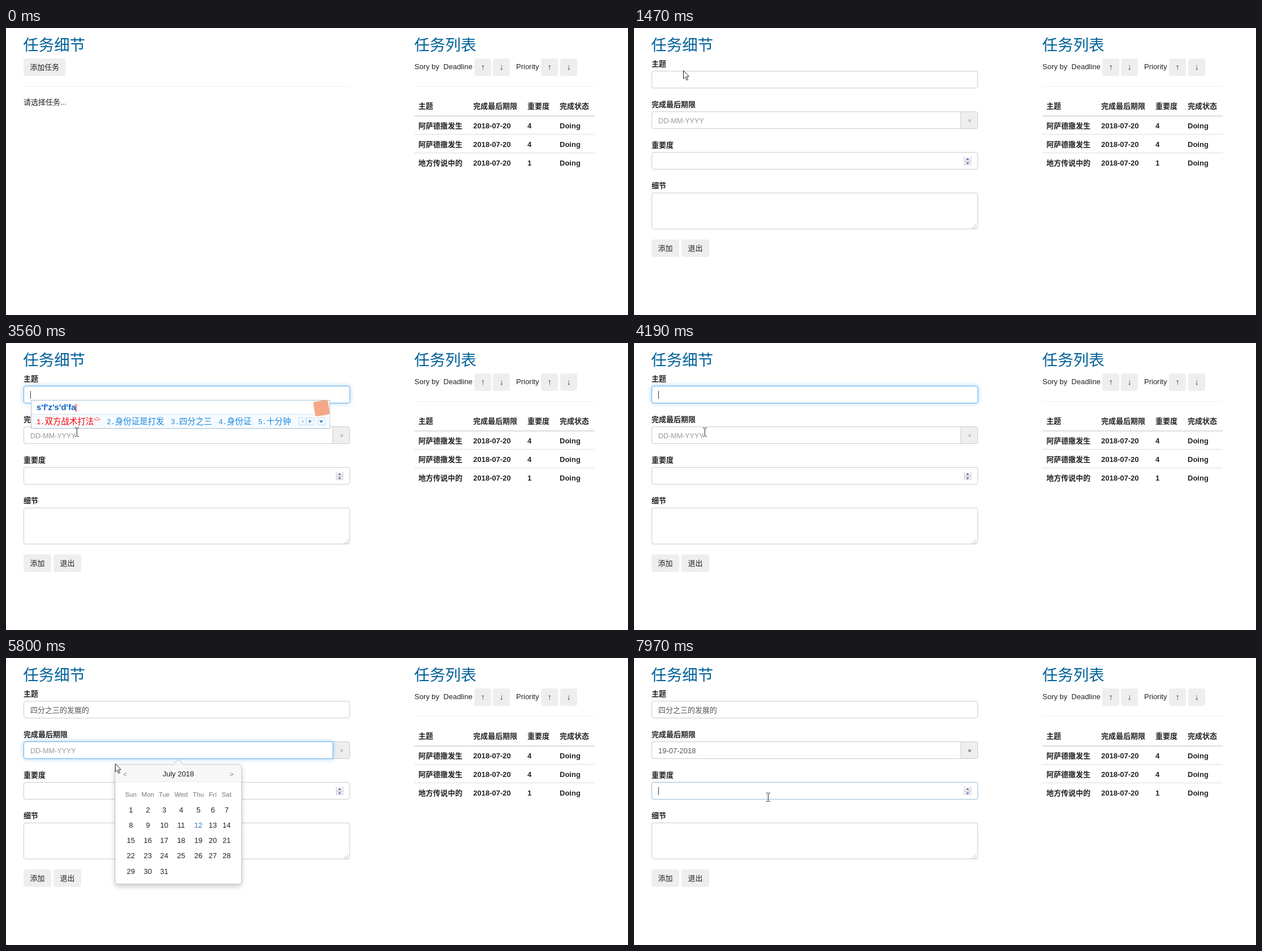
An HTML page for the animation above (8000 ms loop, 1101 by 509 pixels).

```html
<!DOCTYPE html>
<html lang="zh">
<head>
<meta charset="utf-8">
<title>任务</title>
<style>
html, body { margin: 0; width: 100%; height: 100%; overflow: hidden; background: #fff; }
svg { display: block; width: 100%; height: 100%; }
text { font: 13px "Liberation Sans", "Noto Sans CJK SC", "Noto Sans CJK", sans-serif; fill: #222; white-space: pre; }
.title { font-size: 27.5px; fill: #006199; }
.bold { font-weight: bold; }
.mid { text-anchor: middle; }
.arrow { font-size: 14.5px; fill: #0a4048; }
.value { fill: #555; }
.hint { font-size: 12.5px; fill: #999; }
.week { font-size: 11.5px; fill: #777; }
.today { fill: #337ab7; }
.typed { font-size: 15px; font-weight: bold; fill: #0a62c4; }
.num { font: 12.1px "Liberation Mono", monospace; }
.cand { font-size: 14.5px; font-weight: 300; }
.field { fill: #fff; stroke: #ccc; }
#popup { filter: drop-shadow(0 4px 4px rgba(0,0,0,.2)); }
</style>
</head>
<body>
<svg id="stage" viewBox="0 0 1101 509"></svg>
<script>
const text = (x, y, s, cls = '', extra = '') => `<text x="${x}" y="${y}" class="${cls}" ${extra}>${s}</text>`;
const rect = (x, y, w, h, extra) => `<rect x="${x}" y="${y}" width="${w}" height="${h}" ${extra}/>`;
const line = (x1, x2, y, color, w = 1) => rect(x1, y, x2 - x1, w, `fill="${color}"`);
const button = (x, y, w, label, cls = '', id = '') =>
  rect(x, y, w, 31, `rx="4" fill="#eee" id="${id}"`) + text(x + w / 2, y + 20, label, 'mid ' + cls);
const field = (id, y, h) => rect(31.5, y, 577, h, `rx="3.5" class="field" id="${id}"`);
const caret = (id, x, y) => line(x, x + 1, y, `#333" id="${id}`, 14);

const columns = [730, 827, 923, 980];
const row = (y, cells) => cells.map((s, i) => text(columns[i], y, s, 'bold')).join('');

const list = text(722.5, 39.5, '任务列表', 'title')
  + text(723, 73, 'Sory by  Deadline') + text(903, 73, 'Priority')
  + [[829, '↑'], [862, '↓'], [947, '↑'], [981, '↓']].map(([x, s]) => button(x, 54, 30, s, 'arrow')).join('')
  + line(723, 1042, 103, '#eee')
  + row(143, ['主题', '完成最后期限', '重要度', '完成状态']) + line(723, 1042, 155, '#ddd', 2)
  + row(177.5, ['阿萨德撒发生', '2018-07-20', '4', 'Doing']) + line(723, 1042, 188, '#ddd')
  + row(210.5, ['阿萨德撒发生', '2018-07-20', '4', 'Doing']) + line(723, 1042, 221, '#ddd')
  + row(243.5, ['地方传说中的', '2018-07-20', '1', 'Doing']);

const empty = button(31, 54, 74.5, '添加任务', '', 'add') + line(31, 609, 103, '#eee') + text(31, 136, '请选择任务...');

const spinner = rect(584, 229, 13, 14, 'fill="#f2f2f2"') + line(584, 597, 236, '#bbb')
  + '<path d="M584.500 228v15M596.500 228v15M584 242.500h13" stroke="#d0d0d0"/>'
  + '<path d="M587.500 234l3-3.500 3 3.500zM587.500 238.500l3 3.500 3-3.500z" fill="#5a70b8"/>';
const grip = '<path d="M605 348v1.500M605 351v1.500M602 351v1.500M605 354v1.500M602 354v1.500M599 354v1.500" stroke="#bbb" stroke-width="1.500"/>';

const form = ['主题', '完成最后期限', '重要度', '细节'].map((s, i) => text(31, 67.5 + 72 * i, s, 'bold')).join('')
  + field('subject', 76.5, 30)
  + rect(31.5, 148.5, 577, 30, 'rx="3.5" fill="#eee" stroke="#ccc"')
  + '<path id="date" class="field" d="M578.500 148.500H35a3.500 3.500 0 0 0-3.500 3.500v23a3.500 3.500 0 0 0 3.500 3.500H578.500z"/>'
  + text(594, 167.5, '×', 'mid week', 'id="clear"')
  + field('level', 220.5, 30) + spinner
  + field('detail', 292.5, 64) + grip
  + text(43, 96.5, '四分之三的发展的', 'value', 'id="subjectText"')
  + text(43, 168.5, 'DD-MM-YYYY', 'hint', 'id="dateHint"')
  + text(43, 168.5, '19-07-2018', 'value', 'id="dateText"')
  + caret('subjectCaret', 43, 85) + caret('dateCaret', 43, 157) + caret('levelCaret', 43, 229)
  + button(31, 375, 49, '添加') + button(84, 375, 49, '退出');

const days = [221, 251, 280, 310, 340.5, 366, 390.5];
const calendar = rect(193, 189, 224, 212, 'rx="5" fill="#fff" stroke="#bbb" id="popup"')
  + '<path d="M193.500 219V194a4.500 4.500 0 0 1 4.500-4.500H412a4.500 4.500 0 0 1 4.500 4.500V219z" fill="#f7f7f7"/>'
  + line(193.5, 416.5, 219, '#ebebeb')
  + '<path d="M295 189.500l10-9.500 10 9.500" fill="#f7f7f7" stroke="#bbb"/>'
  + text(210.5, 209.5, '&lt;', 'mid week') + text(305, 209.5, 'July 2018', 'mid') + text(399.5, 209.5, '&gt;', 'mid week')
  + 'Sun Mon Tue Wed Thu Fri Sat'.split(' ').map((s, i) => text(days[i], 246, s, 'mid week')).join('')
  + Array.from({ length: 31 }, (_, i) =>
      text(days[i % 7], 273.5 + 27.3 * Math.floor(i / 7), i + 1, i == 11 ? 'mid today' : 'mid')).join('');

const cursors = {
  arrow: '<path d="M.5.5v14.500l3.300-3.200 2.500 5.700 2.200-1-2.500-5.500h4.500z" fill="#fff" stroke="#222"/>',
  hand: '<path d="M-1.500 12V1.700a1.500 1.500 0 0 1 3 0V8c0-1.600 2.700-1.600 2.700.3 0-1.400 2.400-1.300 2.400.6 0-1 2-1 2 .8V14c0 2-1.400 3-1.600 6.500H-.5c-.3-3-4-6.500-4.500-8.500-.4-1.600 1.700-2 3.500 0z M1.500 8v3M4.200 8.300v3M6.600 9v2.500" fill="#fff" stroke="#222"/>',
  beam: '<path d="M-3-7.500h2.500l1 1 1-1h2.500M-3 7.500h2.500l1-1 1 1h2.500M.5-6.500v13" fill="none" stroke="#222"/>'
};

const group = (id, body) => `<g id="${id}">${body}</g>`;
const $ = id => document.getElementById(id);
$('stage').innerHTML = text(30.3, 39.5, '任务细节', 'title') + list
  + group('empty', empty) + group('form', form) + group('calendar', calendar) + group('ime', '') + group('cursor', '');

// Input method: time, typed letters, candidates
const typing = [
  [3090, "s", '是 说 上 水 时'],
  [3165, "s'f", '是否 身份 双方 释放 十分'],
  [3245, "s'f'z", '身份证 十分钟 四分之 双方 是否'],
  [3325, "s'f'z's", '四分之三 身份证 十分钟 双方 是否'],
  [3395, "s'f'z's'd", '四分之三的 四分之三 身份证 十分钟 双方'],
  [3470, "s'f'z's'd'f", '四分之三的 四分之三 身份证 十分钟 双方'],
  [3550, "s'f'z's'd'fa", '双方战术打法 身份证是打发 四分之三 身份证 十分钟'],
  [3630, "s'f'z's'd'fa'z", '四分之三的发展 四分之三 身份证 十分钟 十分'],
  [3710, "s'f'z's'd'fa'z'd", '四分之三的发展的 四分之三 身份证 十分钟 十分'],
  [4100]
];

function drawIme(letters, words) {
  const em = 14.5;
  let x = 54, items = '';
  words.split(' ').forEach((word, i) => {
    const fill = `style="fill:${i ? '#1787dd' : '#f00'}"`;
    items += text(x, 144, i + 1 + '.', 'num', fill) + text(x + em, 144, word, 'cand', fill);
    x += em * (word.length + 1);
    if (!i) items += `<path d="M${x + 1.5} 136.500q-2-2.500 1.500-3 3-3 5 0 4 .5 2 3z" fill="none" stroke="#f55"/>`;
    x += i ? 12 : 23;
  });
  const end = x - 12, box = 'fill="#f5faff" stroke="#c5ddef"';
  return rect(44.5, 101.5, end + 24, 50, 'fill="#fff" stroke="#a5bfd3"')
    + rect(45, 126, end + 23, 25, 'fill="#f7fbff"') + line(45, end + 39, 126, '#cfe0ee')
    + text(54, 119, letters + '<tspan style="fill:red;font-weight:normal" dx="-1.5">|</tspan>', 'typed') + items
    + [13, 27, 47].map(d => rect(end + d + .5, 132.5, 13, 13, box)).join('')
    + `<path d="M${end + 22} 136v6l-4-3z" fill="#bcd"/><path d="M${end + 32} 136v6l4-3z`
    + `M${end + 50} 137.500h7l-3.500 4z" fill="#1778c8"/>`
    + rect(end + 41, 102.5, 26, 26, `rx="3" fill="#f5a888" transform="rotate(-9 ${end + 54} 115.5)"`);
}

// Screen updates: first, last, count
const updates = [[280, 980, 10], [1150, 1300, 3], [1470, 1470, 1], [1770, 2250, 7], [2560, 3330, 11], [3400, 4190, 11],
  [4280, 4630, 6], [4800, 5560, 11], [5640, 6400, 11], [6480, 6550, 2], [6720, 7490, 11], [7560, 7970, 6]];
const ticks = updates.flatMap(([a, b, n]) => Array.from({ length: n }, (_, i) => a + (b - a) * i / (n - 1 || 1)));

// Pointer path: time, x, y, shape until the next point
const path = [
  [280, 832, 482, 'arrow'], [900, 90, 80, 'hand'], [980, 87, 76, 'hand'], [1400, 87, 75, 'arrow'], [1770, 88, 76, 'arrow'],
  [1850, 100, 84, 'beam'], [2010, 130, 92, 'beam'], [2160, 150, 108, 'arrow'], [2250, 152, 110, 'arrow'],
  [2560, 153, 100, 'beam'], [2640, 154, 87, 'beam'], [2785, 156, 112, 'arrow'], [2940, 150, 155, 'beam'],
  [3090, 145, 182, 'arrow'], [3325, 140, 205, 'arrow'], [3400, 136, 194, 'arrow'], [3475, 128, 172, 'beam'],
  [3555, 125, 158, 'beam'], [4280, 125, 158, 'beam'], [4625, 158, 165, 'beam'], [5640, 158, 165, 'beam'],
  [5780, 190, 184, 'arrow'], [6090, 280, 260, 'hand'], [6395, 342, 311, 'hand'], [6480, 341, 319, 'hand'],
  [6545, 347, 339, 'hand'], [6720, 347, 330, 'hand'], [6940, 347, 330, 'beam'], [7020, 346, 329, 'beam'],
  [7240, 290, 290, 'arrow'], [7480, 238, 250, 'arrow'], [7630, 237, 247, 'beam'], [8000, 237, 247, 'beam']];

function pointer(t) {
  const i = path.findLastIndex(p => p[0] <= t);
  if (i < 0) return null;
  const [t0, x0, y0, shape] = path[i], [t1, x1, y1] = path[i + 1];
  let k = (t - t0) / (t1 - t0);
  if (!i) k = k * k * (3 - 2 * k);
  return { x: x0 + (x1 - x0) * k, y: y0 + (y1 - y0) * k, shape };
}

const show = (id, on) => $(id).style.display = on ? '' : 'none';
const within = (t, a, b) => t >= a && t < b;
const fade = (t, start) => Math.min(1, Math.max(0, (t - start) / 150));

function focus(id, k) {
  const mix = (a, b) => Math.round(a + (b - a) * k);
  $(id).style.stroke = `rgb(${mix(204, 102)},${mix(204, 175)},${mix(204, 233)})`;
  $(id).style.filter = k ? `drop-shadow(0 0 ${4 * k}px rgba(102,175,233,${.6 * k}))` : 'none';
}

function render(now) {
  const time = now % 8000;
  const t = ticks.findLast(u => u <= time + 15) ?? 0;
  const opened = t >= 1470, picked = t >= 6940;

  show('empty', !opened);
  show('form', opened);
  $('add').style.fill = t >= 1150 ? '#ddd' : '#eee';

  focus('subject', fade(t, 1960) - fade(t, 4730));
  focus('date', fade(t, 4730) - fade(t, 6900));
  focus('level', fade(t, 7910));

  show('subjectText', t >= 4270);
  show('subjectCaret', within(t, 2000, 2550) || within(t, 3060, 4790));
  $('subjectCaret').setAttribute('x', t >= 4270 ? 147 : 43);
  show('dateCaret', within(t, 4790, 6900) && (t - 4790) % 1060 < 530);
  show('levelCaret', t >= 7920);
  show('dateHint', !picked);
  show('dateText', picked);
  $('clear').style.fill = picked ? '#333' : '#999';
  show('calendar', t >= 4790 && !picked);

  const stage = typing.findLast(s => s[0] <= t);
  $('ime').innerHTML = stage && stage[1] ? drawIme(stage[1], stage[2]) : '';

  const p = pointer(t);
  $('cursor').innerHTML = p ? cursors[p.shape] : '';
  if (p) $('cursor').setAttribute('transform', `translate(${Math.round(p.x)} ${Math.round(p.y)})`);
}

const start = performance.now();
(function loop() {
  render(performance.now() - start);
  requestAnimationFrame(loop);
})();
</script>
</body>
</html>
```
